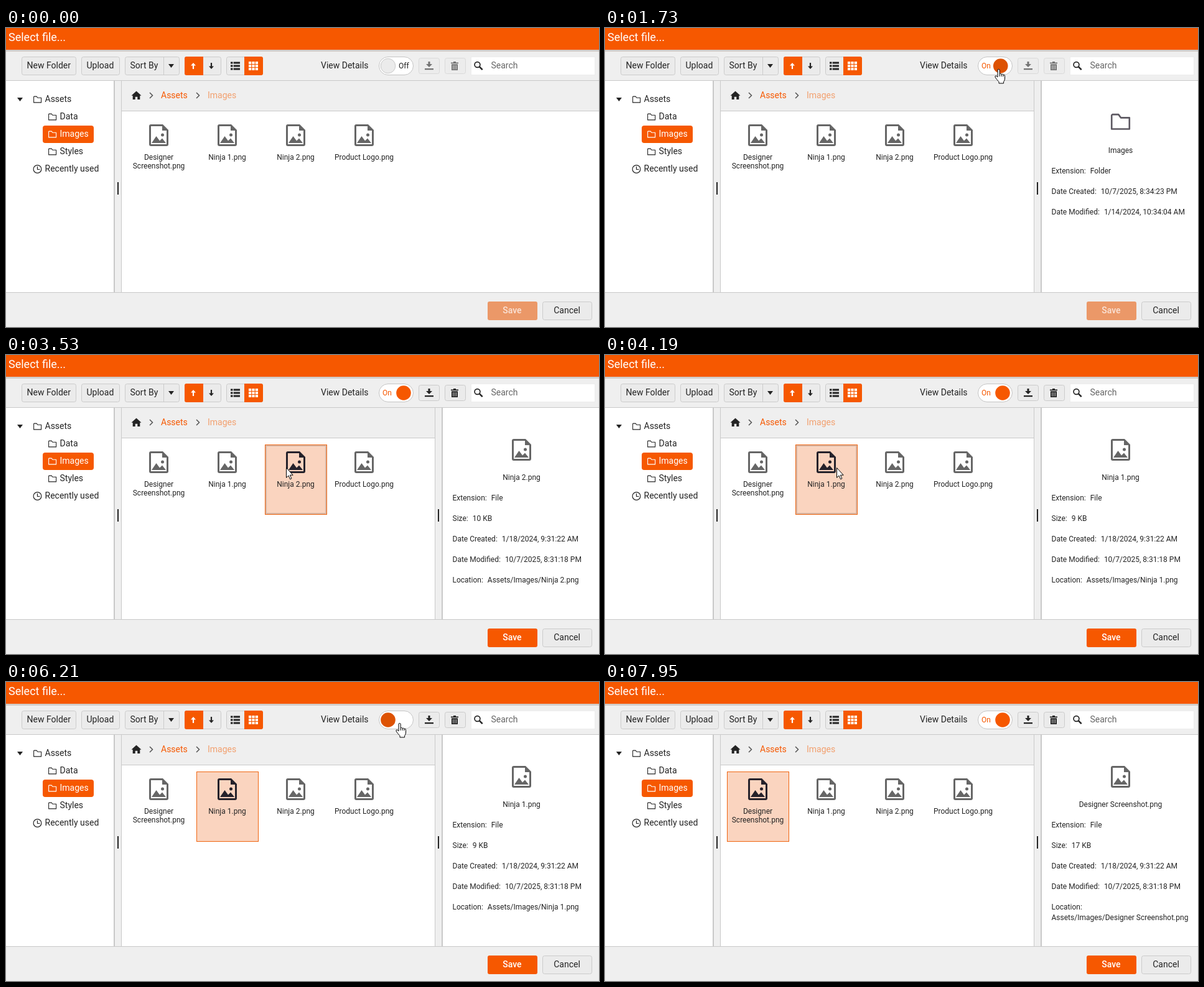
Animation, 953 px wide and 481 px high, one loop 8020 ms. Source, as an HTML page:

```html
<!DOCTYPE html>
<html lang="en">
<head>
<meta charset="utf-8">
<title>Select file</title>
<style>
  html, body { margin: 0; width: 100%; height: 100%; overflow: hidden; background: #fff; }
  svg { display: block; }
  text { font: 14px Roboto, Arial, sans-serif; fill: #242424; white-space: pre; }
  .small text, text.small { font-size: 12px; }
  .mid { text-anchor: middle; }
  .btn { fill: #ebebeb; stroke: #cbcbcb; }
  .hot { fill: #f65800; }
  .pane { fill: #efefef; }
  .ink { fill: #242424; }
  .line { fill: none; stroke: #242424; stroke-width: 1.2; }
  .rule { fill: #c9c9c9; }
  text.white, .white { fill: #fff; }
  text.link { fill: #f65800; }
  text.faded { fill: #f2a06f; }
  .bold { font-weight: 500; }
  .item { color: #666; }
  .item .cell, .item .ring { visibility: hidden; }
  .item.selected { color: #25222b; }
  .item.selected .cell, .item.focused .ring { visibility: visible; }
  .cell { fill: #fad4bf; stroke: #f0640f; }
  .ring { fill: none; stroke: #000; stroke-opacity: .14; stroke-width: 2; }
</style>
</head>
<body>
<svg width="953" height="481" viewBox="0 0 953 481">
  <defs>
    <path id="folder" d="M.6 1.6v9.3h12v-7.6h-5.8l-1.6-2.2h-4.1z" fill="none" stroke="currentColor" stroke-width="1.1" stroke-linejoin="round"/>
    <g id="picture" fill="currentColor">
      <path fill-rule="evenodd" d="M3 0H22L31 9V32a3 3 0 0 1-3 3H3a3 3 0 0 1-3-3V3a3 3 0 0 1 3-3zM3 3V32H28V10H21V3z"/>
      <path d="M4 30l7.5-11 5.5 7.5 4-4 6 7.5z"/>
      <circle cx="21.5" cy="17" r="2.5"/>
    </g>
    <path id="chevron" d="M0 0l4.5 4.5-4.5 4.5" fill="none" stroke="#555" stroke-width="1.5"/>
    <path id="arrow" d="M0-5l4 4.5h-2.9v5.5h-2.2v-5.5h-2.9z"/>
    <path id="caret" d="M-4.5-3h9l-4.5 6z" class="ink"/>
  </defs>

  <rect width="953" height="481" fill="#fff"/>
  <!-- title and toolbar -->
  <rect class="pane" y="35" width="953" height="49"/>
  <rect y="35" width="953" height="3" fill="#d2cdca"/>
  <rect class="hot" width="953" height="35"/>
  <text class="white" x="4" y="21" style="font-size:18px">Select file...</text>
  <rect class="rule" y="84" width="953" height="1"/>
  <g class="btn">
    <rect x="25.5" y="46.5" width="87" height="29" rx="3"/>
    <rect x="121.5" y="46.5" width="61" height="29" rx="3"/>
    <rect x="191.5" y="46.5" width="87" height="29" rx="3"/>
    <rect x="287.5" y="46.5" width="58" height="29" rx="3"/>
    <rect x="354.5" y="46.5" width="58" height="29" rx="3"/>
    <path d="M253.5 47v28"/>
  </g>
  <text x="33.5" y="65">New Folder</text>
  <text x="129.5" y="65">Upload</text>
  <text x="199.5" y="65">Sort By</text>
  <use href="#caret" x="265.5" y="61"/>
  <path class="hot" d="M317 46v30h-27a3 3 0 0 1-3-3v-24a3 3 0 0 1 3-3zM383 46v30h27a3 3 0 0 0 3-3v-24a3 3 0 0 0-3-3z"/>
  <use href="#arrow" class="white" x="301" y="61"/>
  <use href="#arrow" class="ink" transform="translate(330 61) scale(1 -1)"/>
  <path d="M361 56h15M361 61h15M361 66h15" stroke="#242424" stroke-width="3.2" stroke-dasharray="3.5 1.2 10.3 0"/>
  <path d="M390 56h15M390 61h15M390 66h15" stroke="#fff" stroke-width="3.8" stroke-dasharray="4.2 1.2"/>
  <text x="506" y="65">View Details</text>

  <rect x="599.5" y="46.5" width="55" height="29" rx="14.5" fill="#fff" stroke="#c4c4c4"/>
  <text id="on" class="small link" x="605" y="65">On</text>
  <text id="off" class="small" x="631" y="65">Off</text>
  <circle id="knob" cy="61" r="11.8"/>

  <g id="tools">
    <rect class="btn" x="663.5" y="48.5" width="33" height="25" rx="3"/>
    <rect class="btn" x="705.5" y="48.5" width="33" height="25" rx="3"/>
    <path class="ink" d="M678.5 54h3v4h3.5l-5 5-5-5h3.5zM673 65h14v2.3h-14z"/>
    <path class="ink" d="M715 55.5h4v-1.5h4v1.5h4v1.7h-12zM716 58.3h10v9.7h-10z"/>
    <path d="M718.5 60v6.5M721 60v6.5M723.5 60v6.5" stroke="#ebebeb" stroke-width=".8"/>
  </g>
  <rect x="747.5" y="46.5" width="199" height="29" fill="#fff" stroke="#ececec"/>
  <circle class="line" cx="757.5" cy="59" r="4.4" style="stroke-width:1.7"/>
  <path class="line" d="M760.7 62.2l5 5" style="stroke-width:2.4"/>
  <text x="779.5" y="65" style="fill:#666">Search</text>

  <!-- folder tree -->
  <use href="#caret" x="22.5" y="115"/>
  <rect class="hot" x="59" y="157" width="82" height="28" rx="4"/>
  <g color="#242424">
    <use href="#folder" x="44" y="109"/>
    <use href="#folder" x="68" y="137"/>
    <use href="#folder" x="68" y="165" color="#fff"/>
    <use href="#folder" x="68" y="193"/>
  </g>
  <circle class="line" cx="50.5" cy="227" r="6.4"/>
  <path class="line" d="M50.5 222.8v4.7h4"/>
  <text x="62.5" y="119">Assets</text>
  <text x="86.5" y="147">Data</text>
  <text x="86.5" y="175" class="white">Images</text>
  <text x="86.5" y="203">Styles</text>
  <text x="62.5" y="231">Recently used</text>
  <rect class="pane" x="173" y="85" width="13" height="340"/>
  <path class="rule" d="M173 85h2v340h-2zM185 85h1v340h-1z"/>
  <rect class="ink" x="179" y="248" width="2" height="20"/>

  <!-- breadcrumb -->
  <rect class="pane" x="186" y="85" width="767" height="48"/>
  <rect class="rule" x="186" y="133" width="767" height="1"/>
  <path class="ink" d="M209.5 101.5l8 7.2h-2.2v6.3h-4v-4.3h-3.6v4.3h-4v-6.3h-2.2z"/>
  <use href="#chevron" x="231" y="104"/>
  <use href="#chevron" x="306" y="104"/>
  <text class="link" x="249" y="113">Assets</text>
  <text class="faded" x="324" y="113">Images</text>

  <g id="items" class="small"></g>

  <g id="details">
    <rect x="689" y="85" width="264" height="340" fill="#fff"/>
    <rect class="pane" x="689" y="85" width="12" height="340"/>
    <path class="rule" d="M689 85h1v340h-1zM700 85h2v340h-2z"/>
    <rect class="ink" x="694" y="248" width="2" height="20"/>
    <use id="bigFolder" href="#folder" transform="translate(812.8 136.5) scale(2.38)" color="#5d5962"/>
    <use id="bigPicture" href="#picture" x="813" y="135" color="#666"/>
    <g id="info" class="small"></g>
  </g>

  <!-- footer -->
  <rect class="pane" y="425" width="953" height="56"/>
  <rect class="rule" y="425" width="953" height="1"/>
  <rect id="save" x="774" y="440" width="80" height="30" rx="3"/>
  <text id="saveText" class="mid bold" x="813.5" y="459">Save</text>
  <rect class="btn" x="862.5" y="440.5" width="79" height="29" rx="3"/>
  <text class="mid" x="901.5" y="459">Cancel</text>

  <g id="pointer">
    <circle id="press" r="12.5" fill="#ff0" fill-opacity=".5"/>
    <g fill="#fff" stroke="#000" stroke-linejoin="round">
      <path id="tip" d="M.5.5V16.3L4 13l2.6 5.8 2.3-1-2.5-5.6h4.8z"/>
      <path id="hand" transform="translate(-6 -1)" d="M5 13V2a1.6 1.6 0 0 1 3.2 0v6q1.5-1.5 3 .5q1.8-1.2 2.8.8q2.6-.8 2.6 2V15q0 3-2 5.5V23H7v-2.5Q3 16.5 1 13Q.5 10.5 2.7 11zM8.2 8v4M11.2 8.5v3.5M14 9.3v3"/>
    </g>
  </g>
</svg>
<script>
const LOOP = 8020, STEP = 67;
const $ = id => document.getElementById(id);

const CREATED = '1/18/2024, 9:31:22 AM', MODIFIED = '10/7/2025, 8:31:18 PM';
const files = [
  { lines: ['Designer', 'Screenshot.png'], size: '17 KB', wrap: true },
  { lines: ['Ninja 1.png'], size: '9 KB' },
  { lines: ['Ninja 2.png'], size: '10 KB' },
  { lines: ['Product Logo.png'], size: '5 KB', wrap: true }
];

// start, end, target x, target y
const moves = [
  [510, 1180, 632, 67],
  [1913, 2380, 589, 175],
  [2803, 3130, 450, 181],
  [3653, 3920, 372, 181],
  [4323, 4790, 819, 184],
  [4863, 5140, 650, 82],
  [5143, 5350, 632, 67],
  [6480, 6880, 249, 178],
  [7143, 7290, 700, 441]
];
const presses = [[1450, 1520], [2530, 2670], [3400, 3530], [4060, 4190],
                 [5480, 5550], [6140, 6210], [7010, 7150]];
// time, value from then on
const selection = [[0, -1], [2670, 3], [3530, 2], [4190, 1], [7150, 0]];
const focus = [[0, -1], [2530, 3], [3400, 2], [4060, 1], [5480, -1], [7010, 0], [7950, -1]];
const switchOn = [[-999, false], [1520, true], [5550, false], [6210, true]];

const last = (list, t) => list.filter(e => e[0] <= t).pop();
const show = (el, on) => { el.style.visibility = on ? 'visible' : 'hidden'; };
const clamp = v => Math.min(1, Math.max(0, v));
const stepped = (t, start) => Math.floor((t - start) / STEP) * STEP;
const easeOut = u => 1 - (1 - u) ** 2;
const easeInOut = u => u * u * (3 - 2 * u);

$('items').innerHTML = files.map((f, i) => {
  const x = 196 + 110 * i;
  const label = f.lines.map((s, n) => `<text class="mid" x="${x + 49.5}" y="${212 + 14 * n}">${s}</text>`).join('');
  return `<g class="item"><rect class="cell" x="${x + .5}" y="144.5" width="99" height="112"/>
    <rect class="ring" x="${x + 2}" y="146" width="96" height="109"/>
    <use href="#picture" x="${x + 34}" y="155"/>${label}</g>`;
}).join('');
const items = [...document.querySelectorAll('.item')];

function infoMarkup(file) {
  const name = file ? file.lines.join(' ') : 'Images';
  const rows = file
    ? [['Extension', 'File'], ['Size', file.size], ['Date Created', CREATED],
       ['Date Modified', MODIFIED], ['Location', 'Assets/Images/' + name]]
    : [['Extension', 'Folder'], ['Date Created', '10/7/2025, 8:34:23 PM'],
       ['Date Modified', '1/14/2024, 10:34:04 AM']];
  return `<text class="mid" x="828.5" y="201">${name}</text>` + rows.map(([key, value], i) => {
    const place = key === 'Location' && file.wrap ? 'x="717.5" dy="17"' : 'dx="7"';
    return `<text x="717.5" y="${234 + 33 * i}">${key}:<tspan ${place}>${value}</tspan></text>`;
  }).join('');
}

function pointerAt(t) {
  let x = 807, y = 390;
  moves.forEach(([start, end, tx, ty], i) => {
    if (t < start) return;
    const raw = t >= end ? 1 : clamp(stepped(t, start) / (end - start));
    const u = (i ? easeInOut : easeOut)(raw);
    x += (tx - x) * u;
    y += (ty - y) * u;
  });
  return [x, y];
}

function drawSwitch(t, hover) {
  const [since, on] = last(switchOn, t);
  const u = easeInOut(clamp(stepped(t, since) / 260));
  const knob = $('knob');
  knob.setAttribute('cx', on ? 614 + 25 * u : 639 - 25 * u);
  knob.style.fill = on ? (hover ? '#dd5203' : '#f65800') : (hover ? '#e0e0e0' : '#ebebeb');
  knob.style.stroke = on ? 'none' : '#c8c8c8';
  show($('on'), on && u > .8);
  show($('off'), !on && u > .8);
  return on;
}

let shown;
function drawSelection(t) {
  const picked = last(selection, t)[1], ring = last(focus, t)[1];
  items.forEach((el, i) => {
    el.classList.toggle('selected', i === picked);
    el.classList.toggle('focused', i === ring);
  });
  if (picked === shown) return;
  shown = picked;
  const any = picked >= 0;
  $('info').innerHTML = infoMarkup(files[picked]);
  $('bigFolder').style.display = any ? 'none' : '';
  $('bigPicture').style.display = any ? '' : 'none';
  $('tools').style.opacity = any ? 1 : .6;
  $('save').style.fill = any ? '#f65800' : '#eb9868';
  $('saveText').style.fill = any ? '#fff' : '#fae3d7';
}

function draw(t) {
  const [x, y] = pointerAt(t);
  const visible = t >= 510 && t < 7350;
  const hover = visible && x > 599 && x < 655 && y > 46 && y < 76;
  $('pointer').style.display = visible ? '' : 'none';
  $('pointer').setAttribute('transform', `translate(${Math.round(x)} ${Math.round(y)})`);
  $('hand').style.display = hover ? '' : 'none';
  $('tip').style.display = hover ? 'none' : '';
  $('press').style.display = presses.some(([a, b]) => t >= a && t < b) ? '' : 'none';
  drawSelection(t);
  $('details').style.display = drawSwitch(t, hover) ? '' : 'none';
}

const begin = performance.now();
function tick() {
  draw((performance.now() - begin) % LOOP);
  requestAnimationFrame(tick);
}
tick();
</script>
</body>
</html>
```
